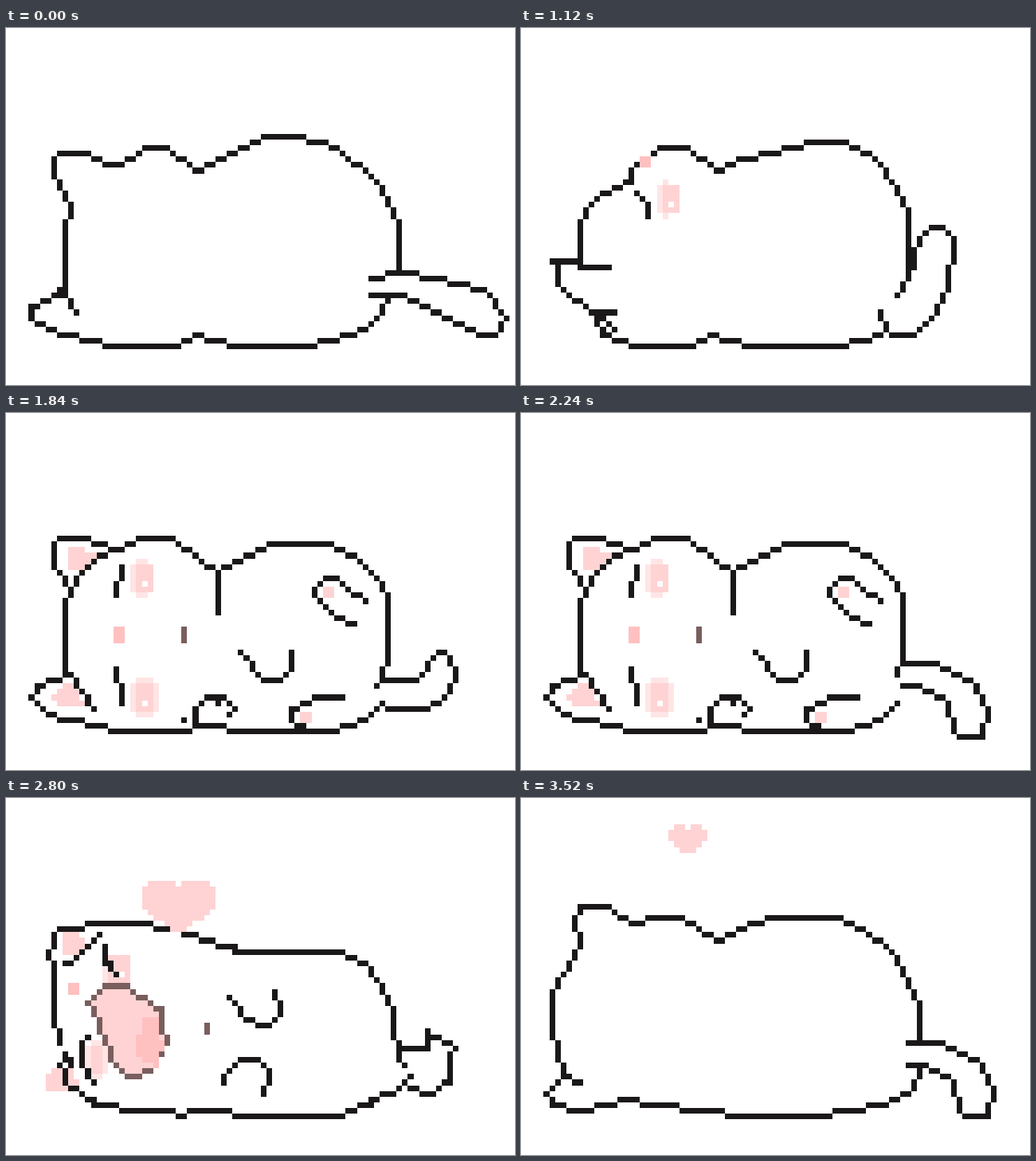
These frames come from a looping animation (639 px wide and 448 px high, 3.6 s). An HTML page with a canvas:

```html
<!DOCTYPE html>
<html lang="en">
<head>
<meta charset="utf-8">
<title>Rolling cat</title>
<style>
html, body { margin: 0; width: 100%; height: 100%; overflow: hidden; background: #fff; }
canvas { display: block; width: 639px; height: 448px; }
</style>
</head>
<body>
<canvas id="stage" width="639" height="448"></canvas>
<script>
(() => {
  const ctx = document.getElementById('stage').getContext('2d');
  const LOOP = 3600, STEP = 80;
  const INK = '#1a1818', BROWN = '#7a5e5e', ROSE = '#ffc0c0', PINK = '#ffd3d3', PALE = '#ffe5e5';

  const mix = (a, b, k) => a + (b - a) * k;
  const points = s => s.trim().split(' ').map(p => p.split(',').map(Number));
  const box = (x, y, w, h) => `${x},${y} ${x + w - 1},${y} ${x + w - 1},${y + h - 1} ${x},${y + h - 1}`;
  const oval = (x, y, w, h) => {
    const r = x + w - 1, b = y + h - 1;
    return `${x + 1},${y} ${r - 1},${y} ${r},${y + 1} ${r},${b - 1} ${r - 1},${b} ${x + 1},${b} ${x},${b - 1} ${x},${y + 1}`;
  };

  // Each pose lists the same landmarks, so poses blend point by point.
  // Back contour: jaw, cheek, ear, crown, nape, back, rump, hip.
  const back = {
    away: '10,46 10,33 11,31 8,25 8.6,21 14,21 18,23 20,23 24,20 28,20 33,24 41,20 45,18 51,18 58,20 65,26 67,30 69,34 69,42',
    turn: '10,40 10,33 11,31 13,29 16,27 18,26 19,26 19,24 24,20 29,20 34,24 39,22 51,19 57,19 62,22 66,27 68,32 68,43 66,46',
    belly: '10,44 10,33 11,30 8,26 8.6,21 13,21 17,22 19,23 24,21 29,21 37,27 42,24 47,22 56,22 61,24 65,28 67,32 67,42 66,45',
    yawn: '10,45 9,36 11,28 8,24 8.6,20 13,20 16,22 16,23 21,22 29,22.6 36,28 39,26 42,25 60,25 67,26 68,31 64.5,33 66,36 66,45',
    sigh: '8,39 6,36 5,32 6,28 9,24 11,24 15,20 18,19 25,19 31,22 41,21 41,24 38,28 46,27 49,26 58,26 67,30 70,35 72,39',
    settle: '7,48 5,40 5,33 10,25 9,20 10,18 15,18 19,21 24,20 28,20 34,24 41,21 44,20 55,20 60,22 65,26 68,31 70,36 70,42'
  };

  // Floor contour: hip to chin, then round the near ear.
  const floor = {
    away: '67,47 64,51 60,53 53,55 41,55 33.5,53 29,55 18,55 8,52.4 4,50 4,48 9.4,45 12,49',
    turn: '63,49 64,52 60,54 55,55 41,55 33,53 29,55 20,55 14,53 13,50 6,44 5.4,40 15,41',
    belly: '66,50 63,53 60,54 57,55 42,55 36,54 29,55 20,55 8,52.4 4,49 5,47 11,45 15,51',
    yawn: '68,51 67,54 62.5,54 59,55 36,55 32,53 29,55 19,55 9,53 4,49 6,46 10,46 14,51',
    sigh: '76,43 71,45 65,51 58,54 53,55 40,55 34,54 29,53 24,52 18,50 14,45 11,42 8,39',
    settle: '70,47 69,50 63,53 52,55 39,55 32,54 24,53 18,52 10,54 5,53 4,51 7,48 10,49'
  };
  const tucked = floor.away.replace('67,47', '64,51');

  // Tail: lower root, tip, upper root.
  const tail = {
    right: '64,46 69,46 76,49 84,53 86,53 88,50 84,45 76,43 69,42 64,43',
    down: '65,48 65,56 64,60 63,66 66,68 69,62 70,57 69,51 67,46 69,42',
    up: '65,53 69,53 73,49 75,44 76,36 74,34 72,34 70,36 69,39 69,41',
    hook: '66,50 67,51 74,51 78,48 79,45 77,41 76,41 72,46 66,46 65,47',
    stand: '69,52 72,52 75,48 76,40 74,38 72,38 71,44 68,47 65,47 68,51',
    fork: '71,46 77,50 81,50 82,47 78,46 76,43 79,40 78,38 74,38 72,39',
    curl: '68,46 71,46 76,49 77,54 79,55 82,55 83,50 80,45 73,42 68,42'
  };
  const lowCurl = points(tail.curl).map(([x, y]) => `${x - 1},${y + 1}`).join(' ');

  const hold = (from, to, shape) => [[from, shape], [to, shape]];
  const track = (style, from, to, ...keys) =>
    ({ ...style, from, to, keys: keys.map(([t, s]) => [t, points(s)]) });
  const line = (...args) => track({ stroke: INK }, ...args);
  const fill = (color, ...args) => track({ fill: color }, ...args);
  const still = (style, from, to, ...shapes) => shapes.map(s => track(style, from, to, [from, s]));
  const roll = (body, rest) => line(0, LOOP,
    ...hold(0, 560, body.away), ...hold(640, 800, rest), [1120, body.turn],
    ...hold(1760, 2240, body.belly), [2560, body.yawn], [3120, body.sigh], [3520, body.settle], [LOOP, body.away]);

  // Face features from the turn to the sigh; the near side shows from belly to yawn.
  const face = (turn, belly, yawn, sigh) => [1040, 3280, [1120, turn], ...hold(1760, 2240, belly), [2560, yawn], [3120, sigh]];
  const near = (belly, yawn) => [1520, 2880, ...hold(1760, 2240, belly), [2560, yawn]];
  const shut = '31,37 '.repeat(4) + '31,39 '.repeat(4);

  const tracks = [
    // ear linings
    fill(PINK, ...near('11,23 12,23 15,24 13,26 11,26', '10,23 12,23 14,25 13,26 10,26')),
    fill(PINK, ...near('10,47 11,47 13,50 9,50 8,49', '8,47 11,47 12,50 7,50 7,48')),
    ...still({ fill: PINK }, 2960, 3360, '37,23 38,23 38,26 36,26 34,24'),
    // cheeks
    fill(PALE, ...face(oval(24, 26, 3, 7), oval(22, 25, 4, 7), oval(15, 27, 4, 7), oval(19, 27, 7, 5))),
    fill(PINK, ...face(box(25, 27, 3, 5), box(23, 26, 3, 5), box(16, 27, 2, 6), box(20, 28, 7, 3))),
    fill('#fff', ...face('26,30', '24,29', '17,31', '25,29')),
    fill(PALE, ...near(oval(22, 46, 5, 7), oval(14, 42, 4, 7))),
    fill(PINK, ...near(box(23, 47, 3, 5), box(15, 43, 2, 5))),
    ...still({ fill: '#fff' }, 1520, 2400, '24,50'),
    // paw pads
    ...still({ fill: PINK }, 1600, 2400, box(56, 30, 2, 2), box(52, 52, 2, 2)),
    // mouth
    track({ fill: PINK, stroke: BROWN }, 1600, 3360, ...hold(1840, 2240, shut),
      [2560, '24,31 28,31.5 33,36 33,42 28.5,48 23,48 20,45 20,34'],
      [3120, '8,33 12,33 18,37 21,43 21,46 19,48 17,48 7,36']),
    fill(ROSE, 2400, 3280, [2560, '29,35 31,35 32,40 31,45 28,43'], [3120, '17,43 19,43 20,46 19,47 16,45']),
    ...still({ stroke: BROWN }, 2400, 2880, '35,39 35,40'),
    // body
    roll(back, back.away),
    roll(floor, tucked),
    line(0, LOOP, [0, tail.right], ...hold(640, 720, tail.down), [1120, tail.up], [1840, tail.hook], [2240, lowCurl],
      [2560, tail.stand], [3120, tail.fork], [3360, tail.right], [3520, tail.curl], [LOOP, tail.right]),
    // chin, far ear, nape and far paws
    ...still({ stroke: INK }, 1040, 1280, '13,49 16,49', '14,50 16,52'),
    line(...near('11,30 12,28 16,24 17,24', '10,28 11,28 15,24 16,23')),
    ...still({ stroke: INK }, 1600, 2400, '37,27 37,34', '63,32 59,29 58,28 56,28 54,30 54,31 58,35 61,36',
      '59,49 54,49 50,51 50,53 52,54', '37,50', '31,53'),
    ...still({ stroke: INK }, 2960, 3360, '43,47 47,47 51,48 52,49 52,52 50,53 47,54', '51,50'),
    // near paws
    line(...near('41,41 45,46 48,46 50,44 50,41', '39,34 42,38 46,39 48,37 47,33')),
    line(...near('33,53 33,51 35,49 38,49 40,51 39,52', '38,49 38,48 41,45 44,45 46,47 45,51')),
    // eyes and nose
    line(...face('20,28 21,29 22,30 22,32', '20,26 20,28 19,29 19,31', '16,26 15,28 14,29 14,33', '19,24 20,25 22,26 25,26')),
    line(...near('19,44 19,46 20,47 20,50', '14,41 13,42 13,46 15,49')),
    fill(ROSE, ...face(box(21, 22, 2, 2), box(19, 37, 2, 3), box(14, 37, 2, 3), box(8, 25, 2, 2)))
  ];

  // The heart leaves the mouth, rises and shrinks: top row and half width.
  const heart = [[2480, [[27, 4]]], [2560, [[25, 5]]], [2800, [[14, 6]]], [3120, [[7, 6]]], [3360, [[2, 6]]], [3520, [[4, 3]]]];

  const px = c => Math.round(c * 7.105);
  const py = r => Math.round(4.6 + r * 7.12);

  function span(x0, x1, y, color) {
    ctx.fillStyle = color;
    ctx.fillRect(px(x0), py(y), px(x1 + 1) - px(x0), py(y + 1) - py(y));
  }

  function trace(pts, closed) {
    const path = closed ? [...pts, pts[0]] : pts;
    const cells = [path[0].map(Math.round)];
    for (let i = 1; i < path.length; i++) {
      const [ax, ay] = path[i - 1], [bx, by] = path[i];
      const n = Math.ceil(Math.max(Math.abs(bx - ax), Math.abs(by - ay)));
      for (let j = 1; j <= n; j++) cells.push([Math.round(mix(ax, bx, j / n)), Math.round(mix(ay, by, j / n))]);
    }
    return cells;
  }

  function fillCells(cells, color) {
    const rows = new Map();
    for (const [x, y] of cells) {
      const [a, b] = rows.get(y) || [x, x];
      rows.set(y, [Math.min(a, x), Math.max(b, x)]);
    }
    for (const [y, [a, b]] of rows) span(a, b, y, color);
  }

  function pose(keys, t) {
    const next = keys.findIndex(k => k[0] > t);
    if (next < 0) return keys[keys.length - 1][1];
    if (next === 0) return keys[0][1];
    const [t0, a] = keys[next - 1], [t1, b] = keys[next];
    const k = (t - t0) / (t1 - t0);
    return a.map(([x, y], i) => [mix(x, b[i][0], k), mix(y, b[i][1], k)]);
  }

  function drawHeart(t) {
    if (t < heart[0][0]) return;
    const [y, half] = pose(heart, t)[0].map(Math.round);
    const cx = t > 3360 ? 29 : 30, rows = Math.round(half * 1.5);
    span(cx - half + 1, cx - 1, y, PINK);
    span(cx + 1, cx + half - 1, y, PINK);
    for (let r = 1; r < rows; r++) {
      const w = Math.min(half, Math.round(1.5 * (rows - r) - 1));
      span(cx - w, cx + w, y + r, PINK);
    }
  }

  function draw(now) {
    const t = Math.floor(now % LOOP / STEP) * STEP;
    ctx.fillStyle = '#fff';
    ctx.fillRect(0, 0, 639, 448);
    for (const part of tracks) {
      if (t < part.from || t >= part.to) continue;
      const cells = trace(pose(part.keys, t), !!part.fill);
      if (part.fill) fillCells(cells, part.fill);
      if (part.stroke) for (const [x, y] of cells) span(x, x, y, part.stroke);
    }
    drawHeart(t);
  }

  const start = performance.now();
  function tick() {
    draw(Math.max(0, performance.now() - start));
    requestAnimationFrame(tick);
  }
  tick();
})();
</script>
</body>
</html>
```
